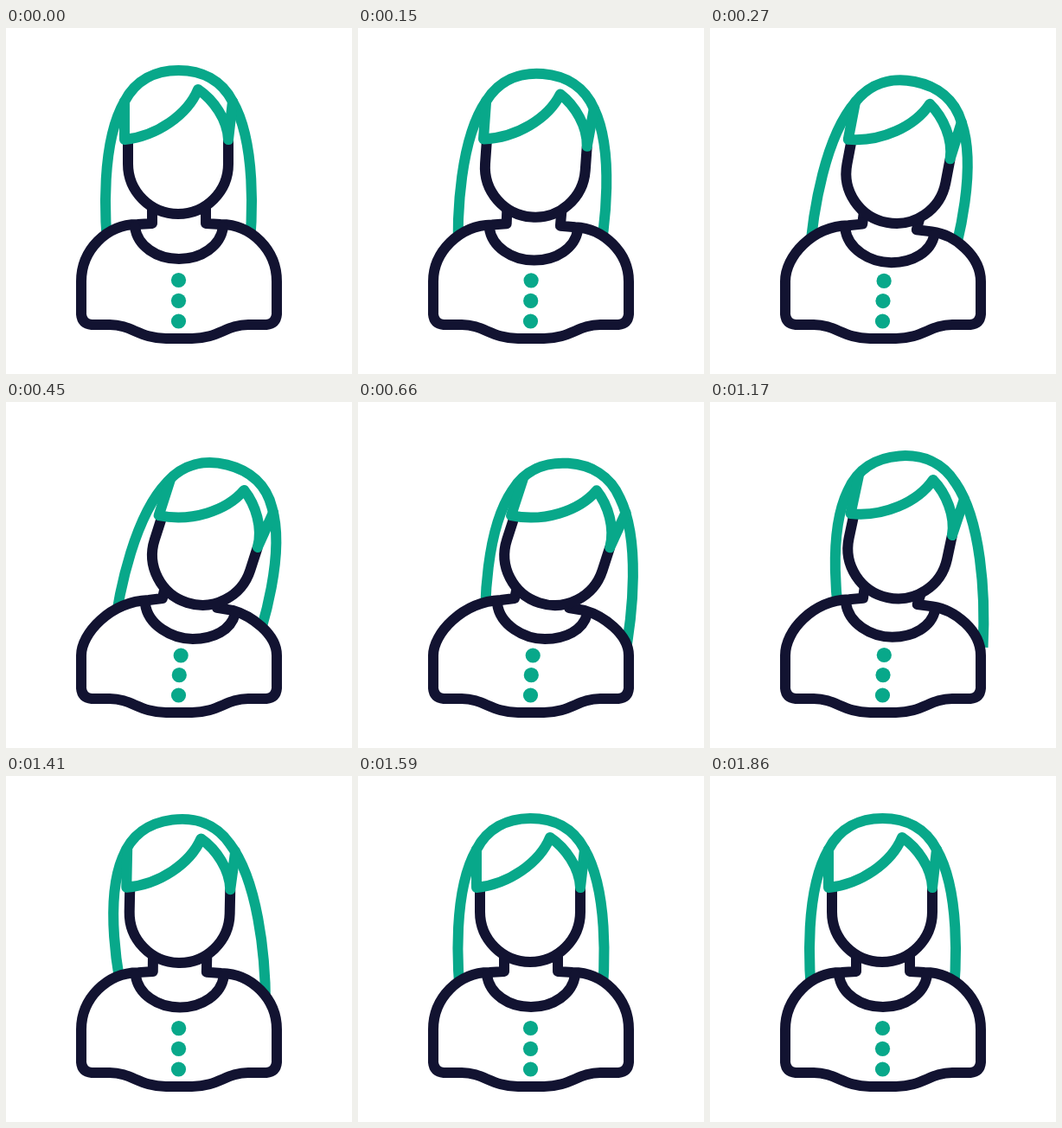
Animation, 400 px wide and 400 px high, one loop 1.89 s. Source, as an HTML page:

```html
<!DOCTYPE html>
<html>
<head>
<meta charset="utf-8">
<style>
html, body { margin: 0; width: 100%; height: 100%; overflow: hidden; background: #fff; }
svg { display: block; width: 100%; height: 100%; }
path { fill: none; stroke: #121331; stroke-width: 12; stroke-linecap: round; stroke-linejoin: round; }
.green { stroke: #08a88a; }
.solid { fill: #fff; }
circle { fill: #08a88a; }
#hair { stroke-linecap: butt; }
</style>
</head>
<body>
<svg viewBox="0 0 400 400">
  <path id="hair" class="green" d="M120 277C112 215 111 130 137 85C150 60 173 49 199.5 49S249 60 262 85C288 130 287 215 279 277"/>
  <path id="body" class="solid"/>
  <path id="collar"/>
  <circle id="top" r="8.6"/>
  <circle id="mid" r="8.6"/>
  <circle cx="199.5" cy="339" r="8.6"/>
  <g id="head">
    <path class="solid" d="M141 132V157A58 58 0 0 0 257 157V130"/>
    <path class="green" d="M137 85V129C175 125 210 100 222 71C240 83 256 106 257 129L262 85"/>
  </g>
</svg>
<script>
const LOOP = 1890, TILT = 18;
const el = id => document.getElementById(id);

const hem = 'V331Q88 342 99 343H120C145 343 155 359 185 359H215C245 359 255 343 280 343H301Q312 342 313 331V293';
const bodyRest = `M169 208L169 226L152 227C116 227 87 257 87 293${hem}C313 257 284 227 248 227L231 226L231 208`;
const bodyLean = `M184 214L181 227L165 229C120 231 87 268 87 293${hem}C313 268 283 247 262 241L244 238L250 228`;
const collarRest = 'M149 230C152 252 174 267 200 267S248 252 251 230';
const collarLean = 'M161 233C164 258 192 274 216 274S260 264 265 245';

const clamp = u => Math.min(1, Math.max(0, u));
const ease = u => (1 - Math.cos(Math.PI * clamp(u))) / 2;
const hump = u => Math.sin(Math.PI * clamp(u)) ** 2;

// Moves every number of path a towards its partner in path b.
function blend(a, b, p) {
  const ends = b.match(/[\d.]+/g);
  let i = 0;
  return a.replace(/[\d.]+/g, v => +v + (ends[i++] - v) * p);
}

function place(id, x, y) {
  el(id).setAttribute('cx', x);
  el(id).setAttribute('cy', y);
}

function draw(t) {
  const p = ease(t / 480) - ease((t - 960) / 540);
  const angle = TILT * p;
  // The hair rides on the head's centre but swings by itself: out, back, settle.
  const swing = 14.5 * hump(t / 800) - 9 * hump((t - 1020) / 610) + 2.5 * hump((t - 1630) / 230);
  const tilt = `translate(${-6 * p * (1 - p)} ${-p}) rotate(${angle} 147 257)`;

  el('head').setAttribute('transform', tilt);
  el('hair').setAttribute('transform', `${tilt} rotate(${swing - angle} 199.5 125)`);
  el('body').setAttribute('d', blend(bodyRest, bodyLean, p));
  el('collar').setAttribute('d', blend(collarRest, collarLean, p));
  place('top', 199.5 + 2.7 * p, 291.5 + 1.5 * p);
  place('mid', 199.5 + 0.8 * p, 315.3 + 0.4 * p);
}

const start = performance.now();
function tick() {
  draw((performance.now() - start) % LOOP);
  requestAnimationFrame(tick);
}
tick();
</script>
</body>
</html>
```
